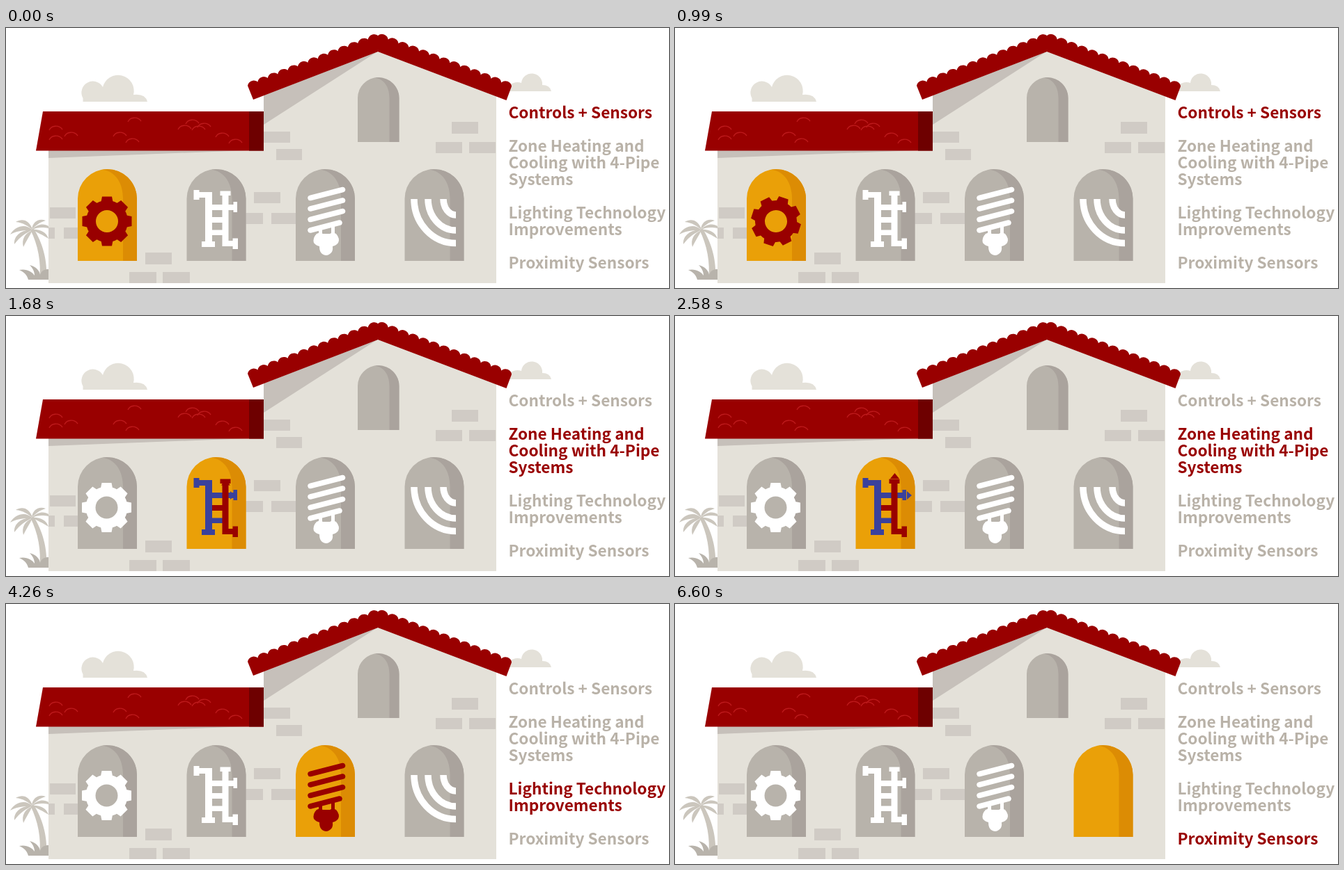
Animation of 952 by 374 pixels, one loop 6.63 s. Source, as an HTML page:

```html
<!DOCTYPE html>
<html lang="en">
<head>
<meta charset="utf-8">
<title>Building systems</title>
<style>
  html, body { margin: 0; width: 100%; height: 100%; overflow: hidden; background: #fff; }
  svg { display: block; width: 952px; height: 374px; }
  .stone { fill: #e4e1d9; }
  .shade { fill: #c6c0ba; }
  .brick { fill: #d0cbc5; }
  .roof { fill: #990000; }
  .pane { fill: #b8b3ab; }
  .side { fill: #aaa39d; }
  .lit .pane { fill: #eaa008; }
  .lit .side { fill: #dc8c04; }
  .icon { color: #fff; fill: currentColor; }
  .lit .icon { color: #990000; }
  .lit .cold { color: #3a419c; fill: currentColor; }
  .line { fill: none; stroke: currentColor; }
  .arrow { display: none; }
  .lit .arrow { display: inline; }
  text {
    font: 700 22.6px "Noto Sans CJK JP", "Noto Sans CJK SC", "Noto Sans CJK", "Open Sans", sans-serif;
    fill: #b9b2a8;
  }
  .on text { fill: #990000; }
</style>
</head>
<body>
<svg id="stage" viewBox="0 0 952 374" xmlns="http://www.w3.org/2000/svg"></svg>
<script>
const LOOP = 6630, STEP = 30;
const STARTS = [0, 1620, 3270, 4950];
const stage = document.getElementById('stage');

const rect = (x, y, x2, y2, cls = '') =>
  `<rect class="${cls}" x="${x}" y="${y}" width="${x2 - x}" height="${y2 - y}"/>`;
const circle = (x, y, r) => `<circle cx="${x}" cy="${y}" r="${r}"/>`;
const path = (d, cls = '') => `<path class="${cls}" d="${d}"/>`;

function arch(x, y, w, bottom) {
  const r = w / 2, inner = x + w * 0.765, mid = x + r, spring = y + r;
  return path(`M${x} ${bottom}V${spring}A${r} ${r} 0 0 1 ${x + w} ${spring}V${bottom}Z`, 'pane') +
    path(`M${mid - r * 0.18} ${y + 0.6}Q${mid} ${y - 0.4} ${mid + r * 0.2} ${y + 0.9}` +
      `A${r} ${r} 0 0 1 ${x + w} ${spring}V${bottom}H${inner}V${spring}` +
      `C${inner} ${y + r * 0.5} ${mid + r * 0.3} ${y + r * 0.08} ${mid - r * 0.18} ${y + 0.6}Z`, 'side');
}

// Gable roof with scalloped tiles along both upper edges
function gable() {
  const tiles = 13;
  const edge = (x, y, x2, y2) => {
    let d = '';
    for (let i = 1; i <= tiles; i++)
      d += `A9 9 0 0 1 ${x + (x2 - x) * i / tiles} ${y + (y2 - y) * i / tiles}`;
    return d;
  };
  return path(`M355 103L347 83${edge(347, 83, 534, 11)}${edge(534, 11, 726, 84)}L718.5 104L534 34Z`, 'roof');
}

const bricks = [
  [370, 149, 408, 165], [388, 174, 425, 190], [640, 135, 678, 152], [617, 164, 655, 180],
  [665, 164, 703, 180], [63, 258, 100, 274], [61, 287, 70, 303], [83, 287, 103, 303],
  [200, 323, 238, 340], [177, 351, 216, 367], [225, 351, 264, 367], [356, 236, 394, 252],
  [344, 266, 369, 282], [381, 266, 416, 282]
].map(b => rect(...b, 'brick')).join('');

const tiles = [
  [62, 147], [62, 161], [84, 156], [175, 135], [154, 156], [172, 165],
  [258, 138], [247, 146], [267, 147], [275, 143], [301, 157], [320, 166]
].map(([x, y]) => `M${x} ${y}c3 -7 14 -8 19 -1`).join('');

const clouds = `<g class="stone">
  ${path('M110.500 106V101A15 15 0 0 1 139 85A22.500 22.500 0 0 1 183 96Q200 94 203 106Z')}
  ${path('M722 91V83Q731 76 740 79A15 15 0 0 1 770 82Q781 82 783 91Z')}</g>`;

const palm = `<g fill="#cbc6bd">
  ${path('M35 290C46 312 51 338 48 362H58C60 334 52 308 40 289Z')}
  ${path('M38 291C29 281 14 284 6 297C17 291 27 291 38 291Z')}
  ${path('M38 290C23 290 11 298 12 311C21 299 28 296 38 290Z')}
  ${path('M38 291C27 295 22 304 25 315C31 303 34 299 38 291Z')}
  ${path('M38 290C34 277 24 273 14 279C25 280 31 285 38 290Z')}
  ${path('M37 290C38 279 47 273 57 277C47 280 43 284 37 290Z')}
  ${path('M37 290C46 281 55 281 61 285V288C51 286 45 287 37 290Z')}
  ${path('M37 290C49 289 58 294 61 303C52 297 46 295 37 290Z')}</g>
  ${path('M32 362C30 355 26 351 19 348C29 346 37 350 41 356C41 350 38 345 34 341C43 343 48 349 49 355' +
    'C51 349 55 347 61 347V362Z', 'pane')}`;

const house = path('M61 176H370V96L534 33L704 97V367H61Z', 'stone') + bricks +
  path('M370 97L534 33.500L370 139Z', 'shade') + path('M61 176H349L61 187Z', 'shade') +
  arch(505, 71, 59.5, 164) + gable() +
  path('M53 120H370V176.500H43Z', 'roof') + rect(349, 120, 370, 176.5, 'dark') +
  `<path d="${tiles}" fill="none" stroke="#bd1a1c" stroke-width="1.300"/>`;

const tooth = path('M-8.500 -28L-7 -35.500H7L8.500 -28Z');
const gear = `<circle class="line" r="23" stroke-width="14"/>` +
  Array.from({ length: 8 }, (_, i) => `<g transform="rotate(${i * 45})">${tooth}</g>`).join('');

const pipes = `<g class="cold">
  <path id="coldTip" class="arrow" d="M333 252V264L340 258Z"/>
  ${rect(269.5, 233, 277.5, 247)}${rect(277, 236, 296, 244)}${rect(286, 236, 296, 312)}
  ${rect(281, 307, 300, 315)}${rect(295, 254, 328, 262)}${rect(326.5, 250, 332, 265)}
  ${rect(295, 290.5, 315, 298)}</g>
  <path id="hotTip" class="arrow" d="M309 234H322L315.500 226Z"/>
  ${rect(307.5, 234.5, 322.5, 241)}${rect(310.5, 240, 319.5, 314)}${rect(296, 272, 315, 280)}
  ${rect(311, 306, 327, 314)}${rect(325.500, 302.500, 333, 318)}`;

const bulb = `<g class="line" stroke-width="7.500" stroke-linecap="round">
  <path d="M437 244.500L483.500 232.500M437 260L483.500 248M437 275.500L483.500 263.500M437 291L479 280"/>
  <path d="M451.500 290V299M469.500 284V299" stroke-width="5" stroke-linecap="butt"/></g>
  ${path('M446 296Q451 293 455 296H465Q469 293 474 296Q480 303 477 309Q474 313 469 314' +
    'Q470 322 465 325Q460 329 454 325Q450 322 450 314Q445 313 442 309Q440 302 446 296Z')}`;

const wave = (rx, ry) => `M${646 - rx} 246A${rx} ${ry} 0 0 0 646 ${246 + ry}`;
const waves = `<path class="line" stroke-width="9.500" d="${wave(60, 63.5)}${wave(40, 45)}${wave(18, 23)}"/>`;

const windows = [gear, pipes, bulb, waves].map((icon, i) =>
  `<g class="window">${arch(103 + i * 156.5, 203, 85, 335)}<g class="icon">${icon}</g></g>`).join('');

const labels = [
  [[130, 'Controls + Sensors']],
  [[178, 'Zone Heating and'], [202, 'Cooling with 4-Pipe'], [226, 'Systems']],
  [[274, 'Lighting Technology'], [298, 'Improvements']],
  [[346, 'Proximity Sensors']]
].map(lines => `<g class="label">${lines.map(([y, s]) =>
  `<text x="721.500" y="${y}">${s}</text>`).join('')}</g>`).join('');

stage.innerHTML = clouds + palm + house + windows + labels;
stage.querySelector('.dark').setAttribute('fill', '#6e0000');

const panes = [...stage.querySelectorAll('.window')];
const icons = [...stage.querySelectorAll('.icon')];
const items = [...stage.querySelectorAll('.label')];
const hotTip = document.getElementById('hotTip');
const coldTip = document.getElementById('coldTip');

const within = (t, a, b) => t >= a && t < b;
const glide = (t, a, b) => {
  const p = Math.min(1, Math.max(0, (t - a) / (b - a)));
  return (1 - Math.cos(Math.PI * p)) / 2;
};

function draw(t) {
  const scene = STARTS.filter(s => t >= s).length - 1;
  const dimmed = within(t, 3660, 4260);
  const hidden = within(t, 3240, 3270) || within(t, 5610, 5700) ||
    within(t, 5880, 5970) || t >= 6600;
  panes.forEach((p, i) => p.classList.toggle('lit', i === scene && !dimmed));
  items.forEach((l, i) => l.classList.toggle('on', i === scene));
  icons.forEach((g, i) => g.setAttribute('visibility', i === scene && hidden ? 'hidden' : 'visible'));

  icons[0].setAttribute('transform', scene === 0
    ? `translate(145 278) rotate(${t * 180 / 1650})`
    : 'translate(144.5 275.5)');
  icons[3].setAttribute('transform', scene === 3
    ? 'translate(646 246) scale(1.015 1.035) translate(-646 -246)' : '');
  hotTip.setAttribute('transform', `translate(0 ${11 * (1 - glide(t, 1590, 1980))})`);
  coldTip.setAttribute('transform', `translate(${-11 * (1 - glide(t, 2130, 2580))} 0)`);
}

const begin = performance.now();
function tick() {
  const t = (performance.now() - begin) % LOOP;
  draw(Math.floor(t / STEP) * STEP);
  requestAnimationFrame(tick);
}
tick();
</script>
</body>
</html>
```
